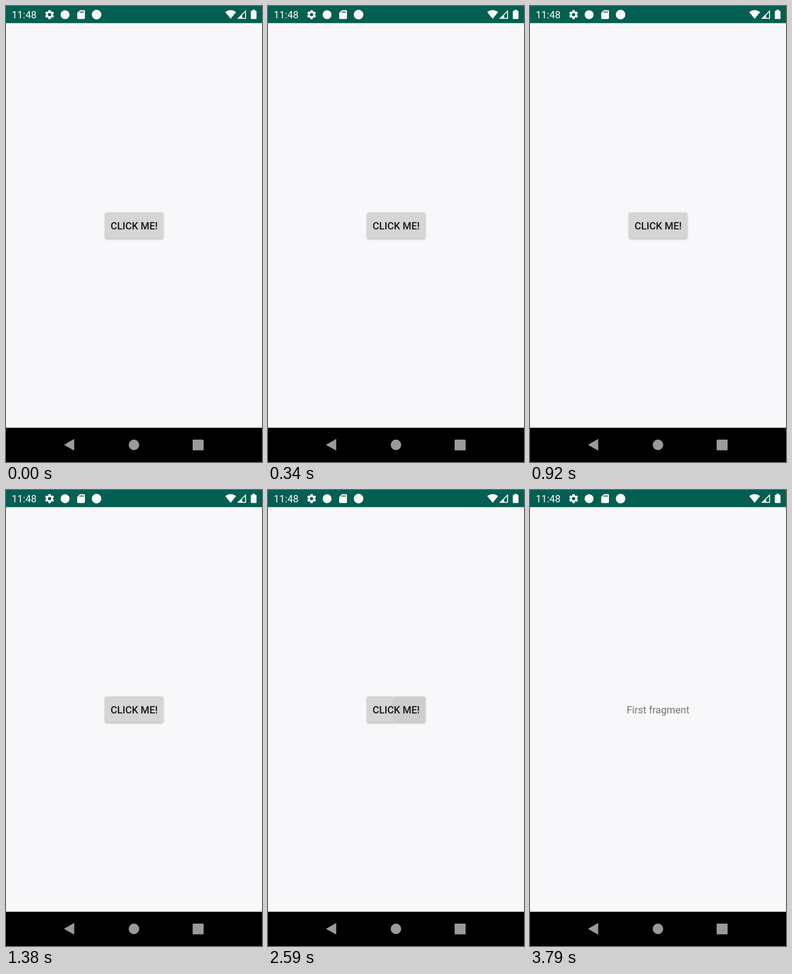
An HTML page with a canvas for the animation above (3830 ms loop, 561 by 998 pixels).

```html
<!DOCTYPE html>
<html lang="en">
<head>
<meta charset="utf-8">
<title>Button and fragment</title>
<style>
  html, body { margin: 0; width: 100%; height: 100%; overflow: hidden; background: #f8f8fa; }
  canvas { display: block; width: 561px; height: 998px; }
</style>
</head>
<body>
<canvas id="stage" width="561" height="998"></canvas>
<script>
const ctx = document.getElementById('stage').getContext('2d');
const W = 561, H = 998;
const LOOP = 3830, PRESS = 1750, OPEN = 3500;
const BAR = '#035f51', WHITE = '#fafcfb', GREY = '#9a9a9a';

function shape(color, path, rule = 'nonzero') {
  ctx.fillStyle = color;
  ctx.beginPath();
  path();
  ctx.fill(rule);
}

function rect(color, x, y, w, h, r = 0) {
  shape(color, () => ctx.roundRect(x, y, w, h, r));
}

function circle(color, x, y, r) {
  shape(color, () => ctx.arc(x, y, r, 0, Math.PI * 2));
}

function polygon(color, ...points) {
  shape(color, () => {
    points.forEach(([x, y]) => ctx.lineTo(x, y));
    ctx.closePath();
  });
}

function label(text, x, y, color, weight = 400, align = 'center') {
  ctx.font = `${weight} 21.9px Roboto, sans-serif`;
  ctx.textAlign = align;
  ctx.fillStyle = color;
  ctx.fillText(text, x, y);
}

function gear(x, y) {
  shape(WHITE, () => {
    for (let i = 0; i < 6; i++) {
      const a = i * Math.PI / 3 - Math.PI / 2;
      for (const [offset, r] of [[-.4, 7.4], [-.25, 10.2], [.25, 10.2], [.4, 7.4]]) {
        ctx.lineTo(x + r * Math.cos(a + offset), y + r * Math.sin(a + offset));
      }
    }
    ctx.closePath();
    ctx.moveTo(x + 3.6, y);
    ctx.arc(x, y, 3.6, 0, Math.PI * 2);
  }, 'evenodd');
}

function memoryCard() {
  polygon(WHITE, [162, 9], [171.5, 9], [173, 10.5], [173, 27], [171.5, 28.5],
    [157.5, 28.5], [156, 27], [156, 15]);
  for (let i = 0; i < 3; i++) rect(BAR, 161.7 + i * 3.3, 11.3, 1.8, 4);
}

function wifi() {
  shape(WHITE, () => {
    ctx.moveTo(492.3, 28);
    ctx.lineTo(480.3, 13.2);
    ctx.quadraticCurveTo(492.3, 4.6, 504.3, 13.2);
    ctx.closePath();
  });
}

function signal() {
  polygon(WHITE, [526, 8.8], [526, 28], [506.5, 28]);
  polygon(BAR, [524, 13.6], [524, 26], [517.5, 26], [517.5, 20]);
}

function statusBar() {
  rect(BAR, 0, 0, W, 37.5);
  label('11:48', 12.5, 27, WHITE, 400, 'left');
  gear(95.5, 18.8);
  circle(WHITE, 129.5, 19, 9.8);
  memoryCard();
  circle(WHITE, 198.5, 18.8, 10.5);
  wifi();
  signal();
  rect(WHITE, 536.5, 10.5, 12.5, 18, 1.5);
  rect(WHITE, 539.8, 8.3, 6, 4);
}

function navigationBar() {
  rect('#000', 0, 923, W, H - 923);
  polygon(GREY, [127, 960.4], [149.5, 947.6], [149.5, 973]);
  circle(GREY, 280.4, 960.5, 11.4);
  rect(GREY, 409, 949, 24, 23.5, 1.5);
}

function button(pressed) {
  ctx.save();
  ctx.shadowColor = 'rgba(0, 0, 0, .32)';
  ctx.shadowBlur = 4;
  ctx.shadowOffsetY = 1.5;
  rect('#d5d5d5', 217.3, 452.3, 127, 56.2, 2.5);
  ctx.restore();
  if (pressed) {
    ctx.save();
    ctx.beginPath();
    ctx.roundRect(217.3, 452.3, 127, 56.2, 2.5);
    ctx.clip();
    circle('#cdcdcb', 314, 482, 45);
    ctx.restore();
  }
  label('CLICK ME!', 280.8, 489, '#161616', 500);
}

function draw(now) {
  const t = now % LOOP;
  rect('#f8f8fa', 0, 0, W, H);
  statusBar();
  navigationBar();
  if (t < OPEN) button(t >= PRESS);
  else label('First fragment', 280.5, 489, '#747474');
}

const start = performance.now();
function tick() {
  draw(performance.now() - start);
  requestAnimationFrame(tick);
}
tick();
</script>
</body>
</html>
```
